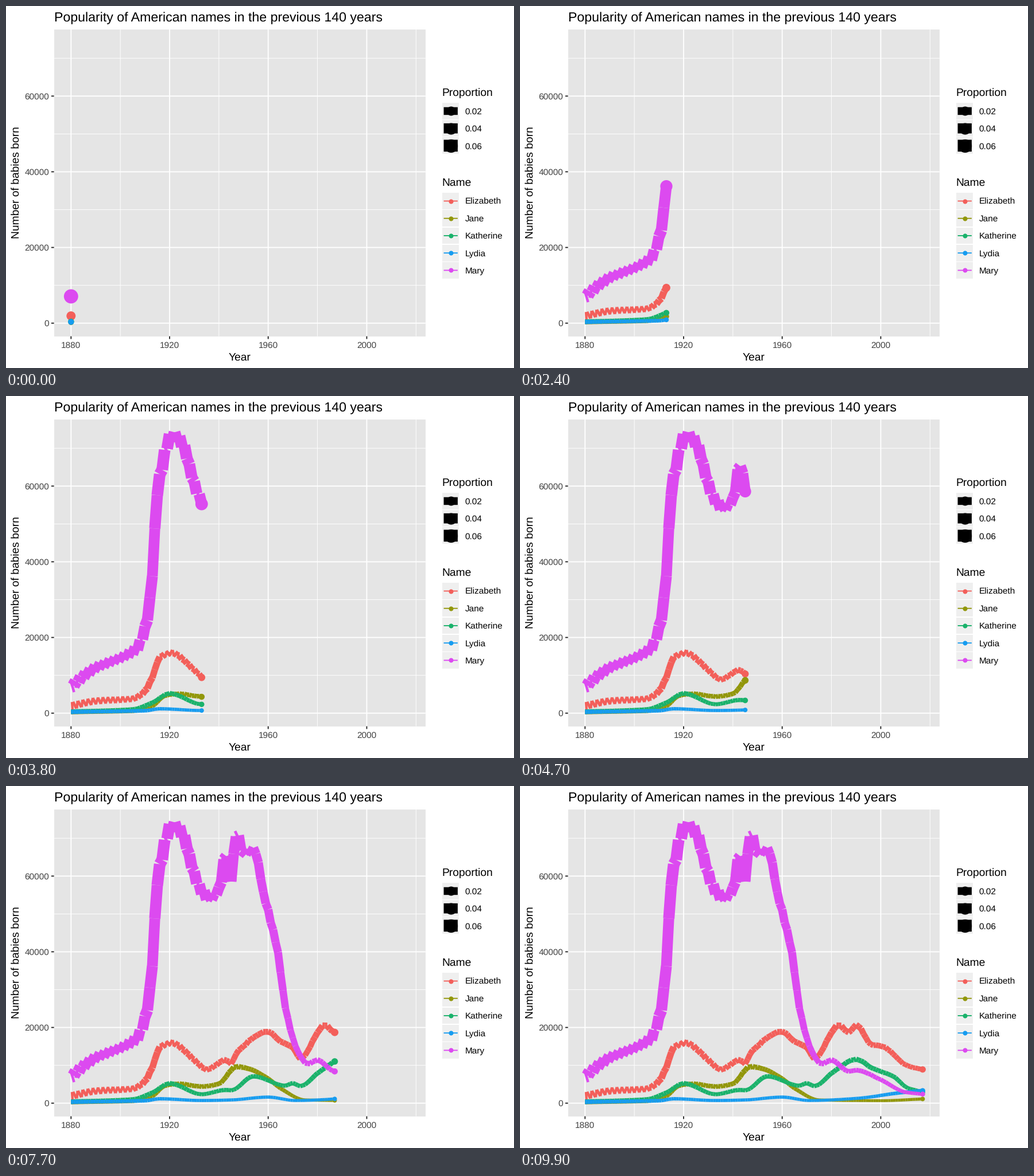
Animation, 885 px wide and 632 px high, one loop 10000 ms. Source, as a matplotlib script:

```python
import matplotlib.pyplot as plt
import numpy as np
from matplotlib.animation import FuncAnimation
from matplotlib.collections import LineCollection
from matplotlib.patches import Rectangle

W, H, DPI = 885, 632, 100
PT = 72 / DPI              # points per pixel
FRAMES, SPAN = 100, 137
YEARS = np.arange(1880, 1880 + SPAN + 1)

plt.rcParams["font.family"] = "Liberation Sans"
plt.rcParams["text.hinting"] = "none"

COLORS = {"Elizabeth": "#F35F5A", "Jane": "#92970B", "Katherine": "#1AB26B",
          "Lydia": "#169CF0", "Mary": "#DC4AF0"}

# Turning points of each curve: (year, thousands of babies)
KEYS = {
    "Elizabeth": [
        (1880, 1.9), (1890, 3.2), (1905, 3.8), (1910, 5.8), (1913, 9.5),
        (1916, 14.7), (1921, 15.9), (1930, 11.4), (1935, 8.9), (1943, 11.4),
        (1945, 10.4), (1947, 13.1), (1960, 18.9), (1965, 16.3), (1970, 14.8),
        (1973, 11.8), (1983, 20.6), (1987, 18.7), (1990, 20.7), (1996, 15.6),
        (2001, 14.9), (2011, 9.8), (2017, 8.9)],
    "Jane": [
        (1880, 0.2), (1905, 0.5), (1913, 1.8), (1918, 4.6), (1924, 5.1),
        (1933, 4.4), (1940, 5.1), (1947, 9.6), (1952, 9.1), (1960, 6.5),
        (1965, 3.9), (1975, 0.85), (2000, 0.65), (2017, 1.1)],
    "Katherine": [
        (1880, 0.4), (1905, 1.0), (1913, 2.75), (1920, 5.2), (1933, 2.35),
        (1943, 3.5), (1945, 3.4), (1954, 7.1), (1967, 4.6), (1970, 5.3),
        (1973, 4.5), (1981, 8.4), (1990, 11.6), (1997, 9.1), (2005, 7.1),
        (2011, 4.0), (2017, 3.0)],
    "Lydia": [
        (1880, 0.33), (1910, 0.65), (1916, 1.15), (1933, 0.7), (1945, 0.85),
        (1960, 1.6), (1971, 0.7), (1990, 1.25), (2008, 2.75), (2017, 3.3)],
    "Mary": [
        (1880, 7.1), (1890, 12), (1900, 14.6), (1907, 17.4), (1911, 25),
        (1913, 37), (1915, 58), (1921, 73.2), (1924, 72.2), (1933, 56),
        (1936, 54.6), (1940, 56.2), (1943, 66), (1945, 59.5), (1947, 71.5),
        (1950, 65.5), (1954, 67.3), (1958, 56), (1964, 39.5), (1967, 25.3),
        (1972, 13.7), (1976, 10.4), (1980, 11.4), (1987, 8.4), (1990, 8.7),
        (2000, 6.2), (2010, 2.9), (2017, 2.4)],
}
BIRTHS = [(1880, 98), (1890, 200), (1900, 275), (1910, 410), (1915, 1020),
          (1921, 1275), (1935, 1087), (1945, 1350), (1957, 2130),
          (1973, 1520), (1990, 2050), (2017, 1840)]


def smooth(keys):
    """Monotone cubic curve through the key points, one value per year."""
    x, y = np.array(keys, float).T
    h = np.diff(x)
    d = np.diff(y) / h
    slope = np.zeros_like(y)
    slope[0], slope[-1] = d[0], d[-1]
    same = d[:-1] * d[1:] > 0
    slope[1:-1][same] = (2 * d[:-1] * d[1:])[same] / (d[:-1] + d[1:])[same]
    i = np.clip(np.searchsorted(x, YEARS, "right") - 1, 0, len(h) - 1)
    t = (YEARS - x[i]) / h[i]
    ease = t * t * (3 - 2 * t)
    bend = slope[i] * t * (1 - t) ** 2 - slope[i + 1] * t * t * (1 - t)
    return 1000 * (y[i] + (y[i + 1] - y[i]) * ease + h[i] * bend)


def build_counts():
    # Early counts swing up in even years; later ones only jitter
    swing = np.interp(YEARS, [1882, 1908, 1914, 1932, 1960],
                      [0.04, 0.04, 0.012, 0.012, 0.004])
    swing = swing * np.where(YEARS % 2, -1, 1) * (YEARS > 1880)
    rng = np.random.default_rng(4)
    counts = {}
    for name, keys in KEYS.items():
        jitter = rng.uniform(-0.008, 0.008, len(YEARS))
        counts[name] = smooth(keys) * (1 + swing + jitter)
    return counts, smooth(BIRTHS)


def px(year):
    return 113.3 + (year - 1880) * 4.293


def py(n):
    return 553.7 - n * 0.006607


def size(share):
    return 1 + 5 * np.sqrt(np.clip(share / 0.0724, 0, 1))


def stroke(s):
    """Line width in pixels for a size in millimetres."""
    return s * 2.845 * 126 / 96


def radius(s):
    return 0.375 * 1.75 * (s * 2.845 + 0.945) + 0.62


def area(r):
    return (2 * r * PT) ** 2


fig = plt.figure(figsize=(W / DPI, H / DPI), dpi=DPI, facecolor="white")
ax = fig.add_axes([0, 0, 1, 1])
ax.set_xlim(0, W)
ax.set_ylim(H, 0)
ax.axis("off")


def label(x, y, s, px_size, color="black", **kw):
    ax.text(x, y, s, fontsize=px_size * PT, color=color, va="baseline", **kw)


def line(xs, ys, color, width, z=1):
    ax.plot(xs, ys, color=color, lw=width * PT, solid_capstyle="butt",
            zorder=z, snap=False)


def dot(x, y, r, color, z=6):
    ax.scatter([x], [y], s=area(r), color=color, linewidths=0, zorder=z,
               snap=False)


def draw_panel():
    left, right, top, bottom = 83.7, 730.8, 40.6, 576.6
    ax.add_patch(Rectangle((left, top), right - left, bottom - top,
                           fc="#E5E5E5", lw=0, zorder=0))
    for i, year in enumerate(range(1880, 2021, 20)):
        x = px(year)
        line([x, x], [top, bottom], "white", 0.94 if i % 2 else 1.87)
        if i % 2 == 0:
            line([x, x], [bottom, bottom + 4.8], "#262626", 1.87)
            label(x, 596.6, str(year), 15.4, "#404040", ha="center")
    for i, n in enumerate(range(0, 70001, 10000)):
        y = py(n)
        line([left, right], [y, y], "white", 0.94 if i % 2 else 1.87)
        if i % 2 == 0:
            line([left - 4.8, left], [y, y], "#262626", 1.87)
            label(75, y + 5.5, str(n), 15.4, "#404040", ha="right")
    label(83.7, 27, "Popularity of American names in the previous 140 years", 23.15)
    label(407.2, 618.5, "Year", 19.25, ha="center")
    ax.text(17.7, 308.6, "Number of babies born", fontsize=19.25 * PT,
            rotation=90, ha="center", va="center")


def draw_key(y, text, color, width, r):
    ax.add_patch(Rectangle((760.3, y - 14.4), 28.8, 28.8, fc="#EFEFEF", lw=0))
    line([762.6, 786.9], [y, y], color, width, 5)
    dot(774.7, y, r, color)
    label(799.3, y + 5.6, text, 15.4)


def draw_legends():
    label(759.5, 157, "Proportion", 19.25)
    for i, share in enumerate((0.02, 0.04, 0.06)):
        s = size(share)
        draw_key(183.4 + 30.24 * i, f"{share:.2f}", "black", stroke(s), radius(s))
    label(759.5, 314, "Name", 19.25)
    for i, (name, color) in enumerate(COLORS.items()):
        draw_key(340.5 + 30.24 * i, name, color, stroke(0.5), radius(1.5))


draw_panel()
draw_legends()

counts, births = build_counts()
tracks = []
for name, color in COLORS.items():
    pts = np.column_stack([px(YEARS), py(counts[name])])
    sizes = size(counts[name] / births)
    segs = np.stack([pts[:-1], pts[1:]], axis=1)
    path = LineCollection([], colors=color, capstyle="butt", zorder=3)
    ax.add_collection(path, autolim=False)
    tracks.append((path, segs, stroke(sizes) * PT, pts, area(radius(sizes))))
heads = ax.scatter(np.zeros(5), np.zeros(5), c=list(COLORS.values()),
                   linewidths=0, zorder=4)

# Each year shows up on the step nearest to its date
ARRIVAL = np.round(np.arange(SPAN + 1) * (FRAMES - 1) / SPAN)


def update(k):
    last = np.flatnonzero(ARRIVAL <= k)[-1]
    for path, segs, widths, _, _ in tracks:
        path.set_segments(segs[:last])
        path.set_linewidths(widths[:max(last, 1)])
    heads.set_offsets([t[3][last] for t in tracks])
    heads.set_sizes([t[4][last] for t in tracks])
    return [t[0] for t in tracks] + [heads]


anim = FuncAnimation(fig, update, frames=FRAMES, interval=100,
                     repeat=True, repeat_delay=0, blit=False)
plt.show()
```
